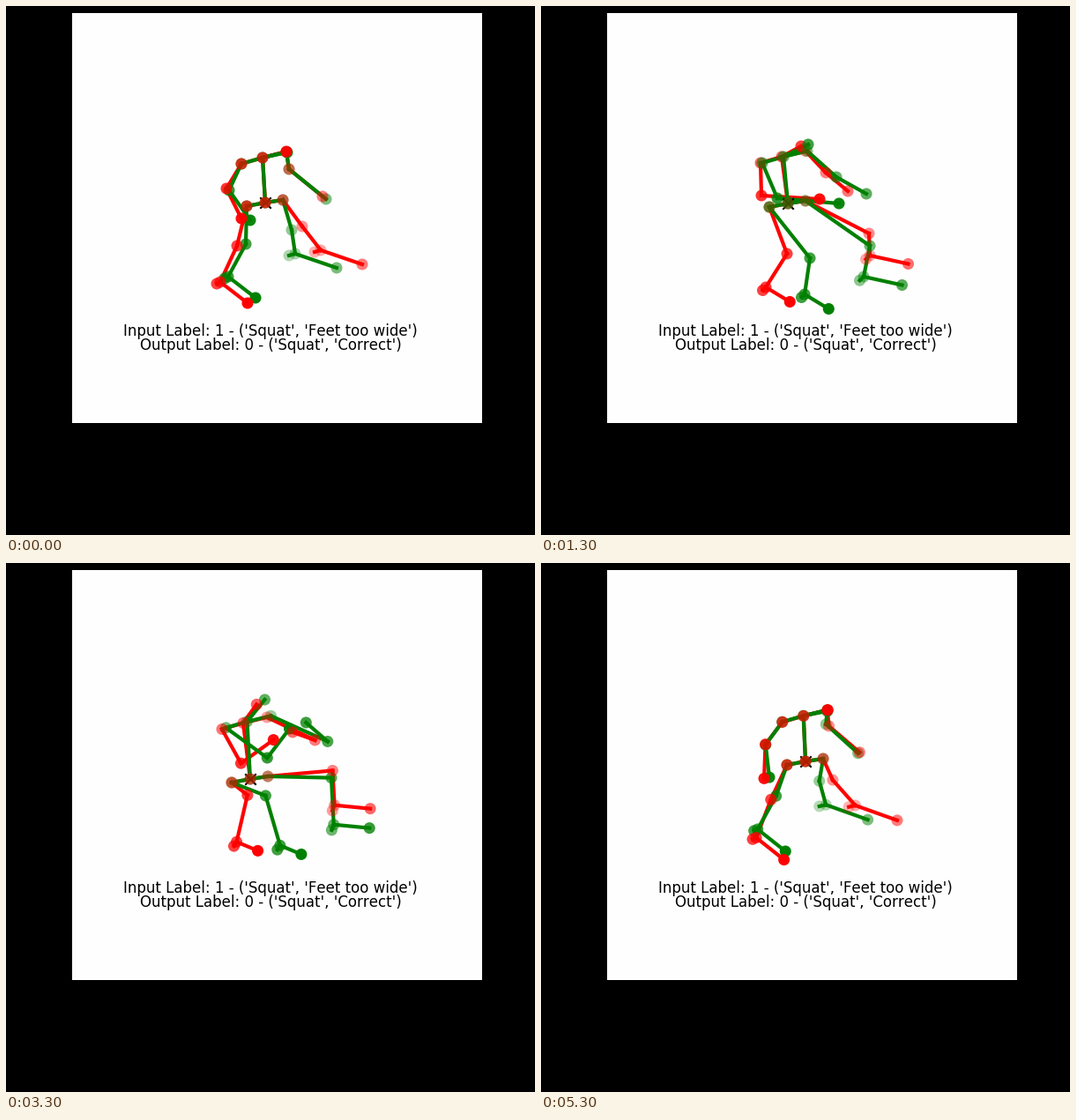
Write a matplotlib script that moves like this. It is 600 px wide and 600 px high and loops after 5.4 s.

```python
import numpy as np
import matplotlib.pyplot as plt
from matplotlib.animation import FuncAnimation
from matplotlib.collections import LineCollection
from matplotlib.patches import Rectangle

SIZE, DPI, FRAMES, STEP = 600, 100, 54, 100
RED, GREEN = (1, 0, 0), (0, 128 / 255, 0)

# Points are complex numbers, x + y*j in pixels with y down.
# Each limb joint swings through upright, half and deep squat,
# given relative to the pelvis: upper joint, then lower joint.
RED_BODY = dict(
    color=RED, near=.08,
    neck=(-3-51j, -7-53j, -8-66j), head=(27-7j, 22-12j, 14-23j),
    left_arm=[(-44-16j, -30-9j, -6-21j), (-27+18j, 36-5j, 18-54j)],
    right_arm=[(27-38j, 43-35j, 81-47j), (65-7j, 68-14j, 42-64j)],
    left_leg=[(-32+49j, -1+57j, -6+8j), (-51+90j, -25+95j, -15+65j)],
    right_leg=[(42+27j, 92+34j, 90-21j), (63+54j, 93+59j, 94+22j)])
GREEN_BODY = dict(
    color=GREEN, near=.28,
    neck=(-3-51j, -5-53j, -3-68j), head=(28-6j, 28-14j, 18-27j),
    left_arm=[(-41-14j, -12-6j, 26-30j), (-17+20j, 58, 34-72j)],
    right_arm=[(27-38j, 55-30j, 95-47j), (69-4j, 89-11j, 54-79j)],
    left_leg=[(-22+47j, 25+62j, 12+7j), (-42+84j, 19+103j, 33+67j)],
    right_leg=[(30+31j, 93+48j, 87-15j), (34+58j, 86+83j, 93+42j)])

# Joint order: pelvis, neck, head, then arms and legs from the trunk outwards
BONES = [(0, 1), (1, 2), (1, 3), (3, 4), (4, 5), (1, 6), (6, 7), (7, 8),
         (0, 9), (9, 10), (10, 11), (11, 12), (11, 13),
         (0, 14), (14, 15), (15, 16), (16, 17), (16, 18)]


def smooth(times, values):
    """Hermite curve through the keys, sampled at every frame."""
    times, values = np.array(times, float), np.array(values)
    speed = np.gradient(values, times)
    t = np.arange(FRAMES)
    k = np.clip(np.searchsorted(times, t, side="right") - 1,
                0, len(times) - 2)
    h = times[k + 1] - times[k]
    u = (t - times[k]) / h
    ease = u * u * (3 - 2 * u)
    return (values[k] * (1 - ease) + values[k + 1] * ease
            + h * u * (1 - u) * ((1 - u) * speed[k] - u * speed[k + 1]))


# Pelvis path, and how deep legs and arms are in the squat (0 to 1)
KEYS = [0, 5, 13, 19, 25, 33, 40, 45, 53]
PELVIS = smooth(KEYS, [294+223j, 295+224j, 280+224j, 277+235j, 282+249j,
                       277+245j, 274+229j, 282+220j, 300+225j])
LEGS = smooth(KEYS, [0, .08, .5, .8, 1, .93, .6, .28, -.07])
ARMS = smooth(KEYS, [0, .15, .5, .8, 1, .92, .45, .07, -.09])


def swing(path, p):
    """Parabola through the upright, half and deep points."""
    up, half, deep = path
    return (up * (1 - p) * (1 - 2 * p) + half * 4 * p * (1 - p)
            + deep * p * (2 * p - 1))


def mix(a, b, p):
    return a + (b - a) * p


def skeleton(body, frame):
    root, leg, arm = PELVIS[frame], LEGS[frame], ARMS[frame]
    neck = root + swing(body["neck"], leg)
    pts = [root, neck, neck + swing(body["head"], leg)]
    for side, shoulder in (("left_arm", -24+7j), ("right_arm", 27-6.5j)):
        pts.append(neck + shoulder)
        pts += [root + swing(path, arm) for path in body[side]]
    feet = (("left_leg", -21+4j, (-4+2j, -3+5j), (31+24j, 23.5+9j)),
            ("right_leg", 20-3j, (-7+2j, -2+6.5j), (47+16j, 40+3j)))
    for side, hip, heel, toe in feet:
        knee, ankle = [root + swing(path, leg) for path in body[side]]
        pts += [root + hip, knee, ankle,
                ankle + mix(*heel, leg), ankle + mix(*toe, leg)]
    return np.column_stack([np.real(pts), np.imag(pts)])


def opacity(body, squat):
    """Fainter when further away; the right side lies behind."""
    core = .68 - .15 * squat
    back = .5 - .12 * squat
    near = body["near"] * squat
    left_arm = [core, .8, .95]
    right_arm = [back, .45 + near, .5 + near]
    left_leg = [core, .75, .75, .75, 1]
    right_leg = [back] + [a + near for a in (.42, .33, .3, .52)]
    return np.clip([core, core, .9 - .3 * squat, *left_arm, *right_arm,
                    *left_leg, *right_leg], 0, 1)


plt.rcParams["text.kerning_factor"] = 6
fig = plt.figure(figsize=(SIZE / DPI, SIZE / DPI), dpi=DPI, facecolor="black")
ax = fig.add_axes([0, 0, 1, 1])
ax.set(xlim=(0, SIZE), ylim=(SIZE, 0))
ax.axis("off")
ax.add_patch(Rectangle((75, 8), 465, 465, color="#fefefe", lw=0))

label = dict(ha="center", va="baseline", fontsize=12, family="DejaVu Sans")
ax.text(300, 373.5, "Input Label: 1 - ('Squat', 'Feet too wide')", **label)
ax.text(300, 390, "Output Label: 0 - ('Squat', 'Correct')", **label)

cross = ax.scatter([0], [0], s=80, c="black", marker="x", zorder=3.5)
figures = []
for body in (RED_BODY, GREEN_BODY):
    limbs = LineCollection([], colors=[body["color"]], linewidths=3,
                           capstyle="projecting", zorder=3)
    dots = ax.scatter([], [], s=88, linewidths=0, zorder=4.5)
    figures.append((body, ax.add_collection(limbs), dots))
red_dots = figures[0][2]


def draw(frame):
    for body, limbs, dots in figures:
        pts = skeleton(body, frame)
        limbs.set_segments([pts[list(bone)] for bone in BONES])
        dots.set_offsets(pts)
        dots.set_facecolors([(*body["color"], a)
                             for a in opacity(body, LEGS[frame])])
    cross.set_offsets(pts[0])
    # Red dots pass behind the green ones on the way down
    red_dots.set_zorder(4 if 3 <= frame < 29 else 5)
    return [cross, *(artist for fig_ in figures for artist in fig_[1:])]


anim = FuncAnimation(fig, draw, frames=FRAMES, interval=STEP,
                     repeat=True, repeat_delay=0)
plt.show()
```
